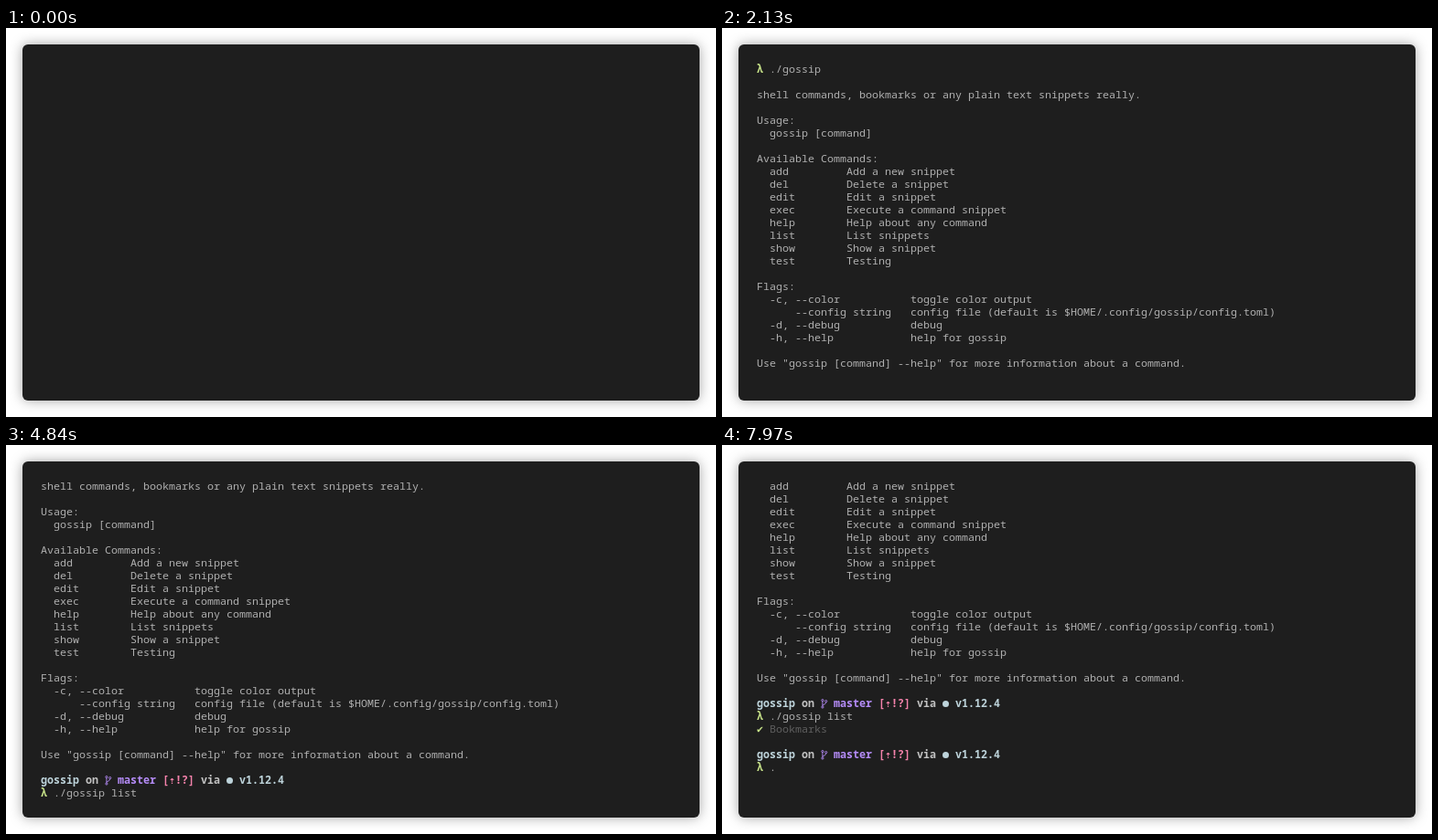
An HTML page with a canvas that plays this animation: 776x426 px, repeating every 8 s.

```html
<!DOCTYPE html>
<html lang="en">
<head>
<meta charset="utf-8">
<title>Terminal session</title>
<style>
  html, body { margin: 0; width: 100%; height: 100%; overflow: hidden; background: #fff; }
  canvas { display: block; width: 776px; height: 426px; }
</style>
</head>
<body>
<canvas id="stage"></canvas>
<script>
const W = 776, H = 426, LOOP = 8000;
const LEFT = 38, TOP = 38, CELL = 7, LINE = 14, ROWS = 25;
const FONT = '11.667px "Noto Sans Mono", "DejaVu Sans Mono", monospace';

const INK = {
  panel: '#1e1e1e', text: '#b0b0b0', bright: '#c2c2c2', dim: '#5f5f5f',
  name: '#bdd3da', branch: '#b58cf8', status: '#f582ab', prompt: '#c9e58a'
};

const HELP = [
  'shell commands, bookmarks or any plain text snippets really.',
  '',
  'Usage:',
  '  gossip [command]',
  '',
  'Available Commands:',
  '  add         Add a new snippet',
  '  del         Delete a snippet',
  '  edit        Edit a snippet',
  '  exec        Execute a command snippet',
  '  help        Help about any command',
  '  list        List snippets',
  '  show        Show a snippet',
  '  test        Testing',
  '',
  'Flags:',
  '  -c, --color           toggle color output',
  '      --config string   config file (default is $HOME/.config/gossip/config.toml)',
  '  -d, --debug           debug',
  '  -h, --help            help for gossip',
  '',
  'Use "gossip [command] --help" for more information about a command.'
];

// Time of each visible keystroke; spaces arrive with the next letter.
const FIRST_KEYS = [520, 820, 1060, 1150, 1350, 1530, 1680, 1780];
const SECOND_KEYS = [3010, 3280, 3540, 3640, 3800, 4050, 4130, 4210, 4550, 4650, 4740, 4840];

const canvas = document.getElementById('stage');
const ctx = canvas.getContext('2d');
const dpr = window.devicePixelRatio || 1;
canvas.width = W * dpr;
canvas.height = H * dpr;

function typed(command, keys, t) {
  let count = keys.filter(k => k <= t).length;
  for (let i = 0; i < count; i++) if (command[i] === ' ') count++;
  return command.slice(0, count);
}

function write(row, col, text, color = INK.text, bold = false) {
  if (row < 0 || row >= ROWS) return;
  ctx.font = (bold ? 'bold ' : '') + FONT;
  ctx.fillStyle = color;
  [...text].forEach((ch, i) => {
    if (ch !== ' ') ctx.fillText(ch, LEFT + (col + i) * CELL, TOP + row * LINE + 11);
  });
}

function branchIcon(x, y) {
  ctx.strokeStyle = INK.branch;
  ctx.lineWidth = 0.9;
  ctx.beginPath();
  for (const [cx, cy] of [[1.9, 3.6], [5.7, 4.6], [1.9, 11]]) {
    ctx.moveTo(x + cx + 1.1, y + cy);
    ctx.arc(x + cx, y + cy, 1.1, 0, Math.PI * 2);
  }
  ctx.moveTo(x + 1.9, y + 4.7);
  ctx.lineTo(x + 1.9, y + 9.9);
  ctx.moveTo(x + 5.7, y + 5.7);
  ctx.quadraticCurveTo(x + 5.5, y + 8, x + 1.9, y + 9);
  ctx.stroke();
}

function shellPrompt(row, input) {
  const y = TOP + row * LINE;
  write(row, 0, 'gossip', INK.name, true);
  write(row, 7, 'on', INK.bright, true);
  branchIcon(LEFT + 10 * CELL, y);
  write(row, 12, 'master', INK.branch, true);
  write(row, 19, '[⇡!?]', INK.status, true);
  write(row, 25, 'via', INK.bright, true);
  ctx.fillStyle = INK.name;
  ctx.beginPath();
  ctx.arc(LEFT + 29.5 * CELL, y + 7.5, 3.5, 0, Math.PI * 2);
  ctx.fill();
  write(row, 31, 'v1.12.4', INK.name, true);
  commandLine(row + 1, input);
}

function commandLine(row, input) {
  write(row, 0, 'λ', INK.prompt, true);
  write(row, 2, input);
}

function menu(row) {
  write(row, 0, 'Use the arrow keys to navigate: ↓ ↑ → ←', INK.dim);
  write(row + 1, 0, '?', INK.bright, true);
  write(row + 1, 2, 'List what:');
  write(row + 2, 2, '▶');
  write(row + 2, 4, 'Bookmarks');
  ctx.fillRect(LEFT + 4 * CELL, TOP + (row + 2) * LINE + 13, 9 * CELL, 1);
  write(row + 3, 4, 'Commands');
  write(row + 4, 4, 'Code snippets');
}

function panel() {
  ctx.fillStyle = '#fff';
  ctx.fillRect(0, 0, W, H);
  ctx.save();
  ctx.shadowColor = 'rgba(0,0,0,0.36)';
  ctx.shadowBlur = 14 * dpr;
  ctx.fillStyle = INK.panel;
  ctx.beginPath();
  ctx.roundRect(18, 18, 740, 390, 6);
  ctx.fill();
  ctx.restore();
}

function draw(t) {
  ctx.setTransform(dpr, 0, 0, dpr, 0, 0);
  panel();
  if (t < 90) return;
  if (t < 2130) {
    shellPrompt(1, typed('./gossip', FIRST_KEYS, t));
    return;
  }

  // Row of the first help line, moving up as output scrolls.
  const top = t < 2220 ? 2 : t < 5000 ? 0 : t < 5050 ? -1 : -6;
  HELP.forEach((line, i) => write(top + i, 0, line));
  if (t < 2220) {
    commandLine(0, './gossip');
    return;
  }
  shellPrompt(top + 23, typed('./gossip list', SECOND_KEYS, t));
  if (t < 5050) return;
  if (t < 6170) {
    menu(19);
    return;
  }
  write(19, 0, '✔', INK.prompt);
  write(19, 2, 'Bookmarks', INK.dim);
  if (t >= 6260) shellPrompt(21, t >= 7970 ? '.' : '');
}

const start = performance.now();
function tick() {
  draw((performance.now() - start) % LOOP);
  requestAnimationFrame(tick);
}
tick();
</script>
</body>
</html>
```
